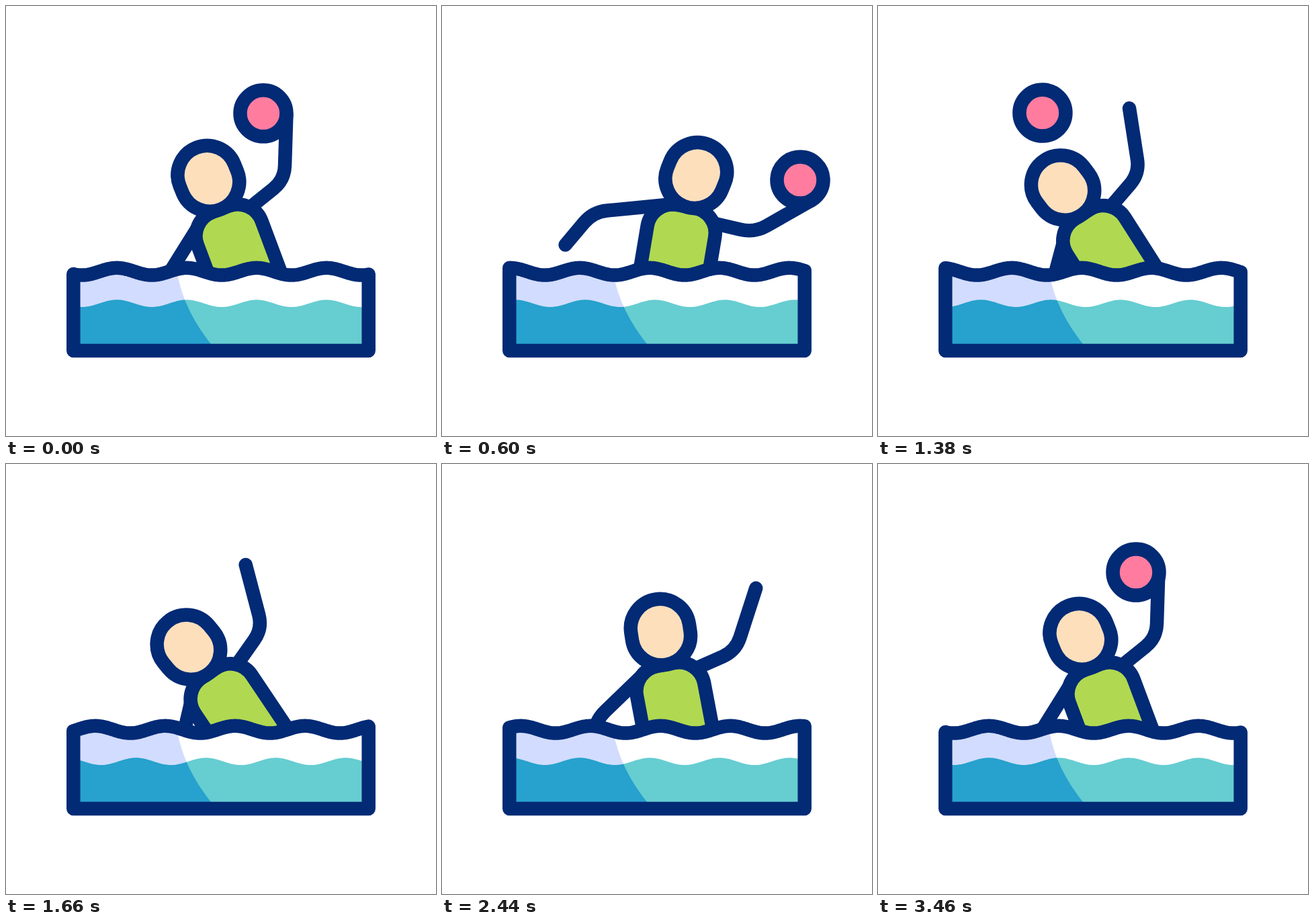
These frames come from a looping animation (640 by 640 pixels, 3600 ms). An HTML page:

```html
<!DOCTYPE html>
<html lang="en">
<head>
<meta charset="utf-8">
<title>Water polo</title>
<style>
  html, body { margin: 0; width: 100%; height: 100%; overflow: hidden; background: #fff; }
  svg { display: block; width: 100vw; height: 100vh; }
  .line { stroke: #022a75; stroke-width: 20.5; stroke-linecap: round; stroke-linejoin: round; }
</style>
</head>
<body>
<svg viewBox="0 0 640 640">
  <clipPath id="shade"><path d="M90 370H249L255 398Q265 455 309 508V520H90Z"/></clipPath>
  <path id="armL" class="line" fill="none"/>
  <path id="armR" class="line" fill="none"/>
  <g id="body">
    <path class="line" fill="#b0d951" d="M-51 50V-45A38 38 0 0 1 -13 -83H13A38 38 0 0 1 51 -45V50"/>
    <g id="head">
      <rect class="line" fill="#fddfbc" x="-43.8" y="-87.3" width="87.6" height="98.6" rx="43.8"/>
    </g>
  </g>
  <circle id="ball" class="line" fill="#ff7c9f" r="34.5"/>
  <path class="top" fill="#fff"/>
  <path class="top" fill="#d2dcfe" clip-path="url(#shade)"/>
  <path class="low" fill="#66cdd1"/>
  <path class="low" fill="#27a1cd" clip-path="url(#shade)"/>
  <path class="top line" fill="none"/>
</svg>
<script>
const LOOP = 3600, END = 3460, RELEASE = 1250;
const LEFT = 100.3, RIGHT = 539.7, FLOOR = 513, PERIOD = 104;
const HIP = [348.5, 380];

// time, torso, head, right upper arm, right forearm, left upper arm (degrees)
const POSES = [
  [0, -20.5, -22, -38.7, -88.2, 122],
  [600, 9.5, 22, 13.1, -29.7, 174.5],
  [820, 11, 25, 15, -27, 177],
  [1080, 8.6, 20.5, 11, -32, 172.5],
  [RELEASE, -20.5, -22, -38.7, -88.2, 122],
  [1380, -32.5, -37, -49.3, -98.8, 105],
  [1500, -34.5, -40, -53, -102, 102.5],
  [1980, -30, -36, -56.6, -107.9, 107.5],
  [2440, -10.7, -8.5, -23.8, -72.1, 136],
  [3040, -17.5, -17, -32.6, -80.5, 124.5],
  [END, -20.5, -22, -38.7, -88.2, 122]
];

// time, shift of the upper wave, shift of the lower wave
const WAVES = [
  [0, 0, 0], [600, 40, 48], [1380, 138, 196], [1980, 217, 280],
  [2440, 264, 352], [3040, 339, 411], [END, 416, 416]
];

const $ = id => document.getElementById(id);
const all = sel => document.querySelectorAll(sel);
const rad = deg => deg * Math.PI / 180;
const polar = ([x, y], deg, len) => [x + len * Math.cos(rad(deg)), y + len * Math.sin(rad(deg))];
const pt = p => p.map(v => v.toFixed(2)).join(' ');

// Smooth monotone interpolation of one table column
function sample(table, col, t) {
  const last = table.length - 1;
  let i = 0;
  while (i < last - 1 && t >= table[i + 1][0]) i++;
  const slope = k => (table[k + 1][col] - table[k][col]) / (table[k + 1][0] - table[k][0]);
  const tangent = k => {
    if (k === 0 || k === last) return 0;
    const a = slope(k - 1), b = slope(k);
    return a * b > 0 ? 2 * a * b / (a + b) : 0;
  };
  const [t0, t1] = [table[i][0], table[i + 1][0]];
  const h = t1 - t0, u = (t - t0) / h, v = 1 - u;
  return table[i][col] * v * v * (1 + 2 * u) + table[i + 1][col] * u * u * (1 + 2 * v)
    + h * u * v * (v * tangent(i) - u * tangent(i + 1));
}

// Point given in torso coordinates, y pointing up the spine
function onBody(x, up, deg) {
  const c = Math.cos(rad(deg)), s = Math.sin(rad(deg));
  return [HIP[0] + x * c + up * s, HIP[1] + x * s - up * c];
}

function drawArm(el, shoulder, upper, upperLen, fore, foreLen) {
  const elbow = polar(shoulder, upper, upperLen);
  const hand = polar(elbow, fore, foreLen);
  el.setAttribute('d', `M${pt(shoulder)}L${pt(polar(elbow, upper, -21))}`
    + `Q${pt(elbow)} ${pt(polar(elbow, fore, 21))}L${pt(hand)}`);
  return hand;
}

function wave(mid, shift) {
  let d = `M${LEFT} ${FLOOR}`;
  for (let i = 0; i <= 220; i++) {
    const x = LEFT + (RIGHT - LEFT) * i / 220;
    const y = mid - 5.4 * Math.cos(2 * Math.PI * (x - 61 - shift) / PERIOD);
    d += `L${x.toFixed(2)} ${y.toFixed(2)}`;
  }
  return d + `V${FLOOR}Z`;
}

function ballAt(t, hand, fore) {
  if (t < RELEASE) return polar(hand, fore - 90, 34.5);
  if (t < 1700) return [246 - 1.06 * (t - 1380), 158.4 + 0.0004 * (t - 1340) ** 2];
  if (t < 2900) return [-100, 240];
  const x = 384 * (1 - ((END - t) / 420) ** 1.5);
  return [x, 156 + 0.00079 * (x - 304) ** 2];
}

function draw(time) {
  const t = Math.min(time, END);
  const [torso, head, upR, foreR, upL] = [1, 2, 3, 4, 5].map(c => sample(POSES, c, t));

  $('body').setAttribute('transform', `translate(${HIP}) rotate(${torso})`);
  $('head').setAttribute('transform', `translate(0 -94) rotate(${head - torso})`);
  drawArm($('armL'), onBody(-26, 81, torso), upL, 112, upL - 44.5, 64);
  const hand = drawArm($('armR'), onBody(30, 66, torso), upR, 78, foreR, 98);

  const [x, y] = ballAt(t, hand, foreR);
  $('ball').setAttribute('cx', x);
  $('ball').setAttribute('cy', y);

  const top = wave(395.2, sample(WAVES, 1, t));
  const low = wave(442.7, sample(WAVES, 2, t));
  all('.top').forEach(el => el.setAttribute('d', top));
  all('.low').forEach(el => el.setAttribute('d', low));
}

const start = performance.now();
function tick() {
  draw((performance.now() - start) % LOOP);
  requestAnimationFrame(tick);
}
tick();
</script>
</body>
</html>
```
